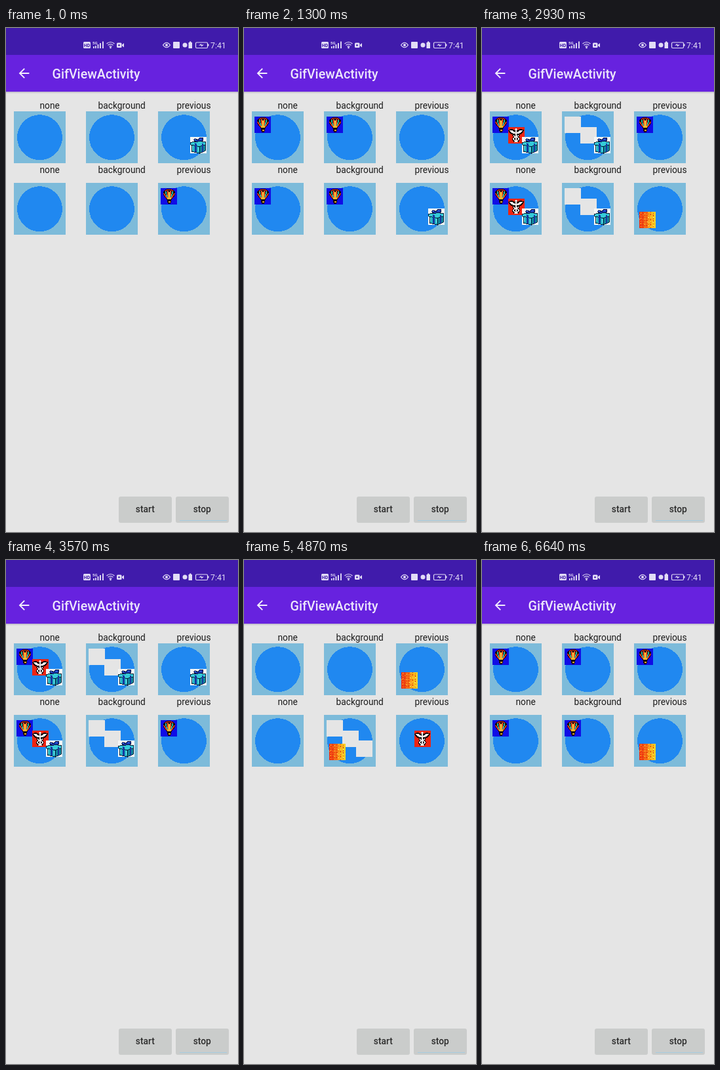
These frames come from a looping animation (354x768 px, 6.96 s). An HTML page:

```html
<!DOCTYPE html>
<html lang="en">
<head>
<meta charset="utf-8">
<title>GifViewActivity</title>
<style>
  html, body { margin: 0; width: 100%; height: 100%; overflow: hidden; background: #e5e5e5; }
  svg { display: block; }
  #stage { position: absolute; left: 0; top: 0; }
  text { font-family: Roboto, "Open Sans", sans-serif; }
  .label { font-size: 13.77px; fill: #1c1c1c; }
  .button { font-size: 13.77px; font-weight: 500; fill: #2c2c2c; text-anchor: middle; }
  .title { font-size: 19.67px; font-weight: 500; fill: #ece6fb; }
  .status { fill: #e2dcf6; }
  .line { fill: none; stroke: #e2dcf6; }
</style>
</head>
<body>
<svg id="stage" width="354" height="768" viewBox="0 0 354 768">
  <defs>
    <linearGradient id="shade" x2="0" y2="1">
      <stop offset="0" stop-color="#b9b5c4"/>
      <stop offset="1" stop-color="#e5e5e5"/>
    </linearGradient>
    <linearGradient id="heat">
      <stop offset="0" stop-color="#ee2d12"/>
      <stop offset=".45" stop-color="#f66a14"/>
      <stop offset=".7" stop-color="#f9b41a"/>
      <stop offset="1" stop-color="#fbd426"/>
    </linearGradient>

    <g id="base">
      <rect width="79" height="79" fill="#7dbbda"/>
      <circle cx="39.5" cy="39.7" r="34.5" fill="#2088f0"/>
    </g>

    <g id="balloon">
      <rect width="25" height="25" fill="#100ce6"/>
      <path d="M13 1C7.500 1 3.500 4 3.500 8c0 4 4.500 6.500 6.500 10.500h6c2-4 6.500-6.500 6.500-10.500C22.500 4 18.500 1 13 1z" fill="#140c10"/>
      <g fill="none" stroke-width="1.700">
        <path d="M10 16C8 12 5 10.500 5 7.500M16 16c2-4 5-5.500 5-8.500" stroke="#e83818"/>
        <path d="M11 16C9.500 11 7.500 9 7.800 5M15 16c1.500-5 3.500-7 3.200-11" stroke="#22b59a"/>
        <path d="M12 16c-.5-5-1.500-7-1.300-12M14 16c.5-5 1.500-7 1.300-12" stroke="#ee5a20"/>
        <path d="M13 17V6" stroke="#f2cf38"/>
        <path d="M7 4.500Q13 0 19 4.500" stroke="#d82a1c" stroke-width="1.300"/>
      </g>
      <path d="M9.500 14h7l-1 3h-5z" fill="#f0b82c"/>
      <path d="M10 18h6l-.7 5.500h-4.600z" fill="#1a1008"/>
      <path d="M11.500 20h3.200v2h-3.200z" fill="#d8a02c"/>
    </g>

    <g id="staff">
      <rect width="25" height="25" fill="#ee2411"/>
      <g fill="none" stroke-linejoin="round">
        <path id="rod" d="M12.500 3v20M2.500 5.500q5-1.500 7 1.500l3 2 3-2q2-3 7-1.500l-3 3.500-5 1.500-2-1-2 1-5-1.500zM8.500 11.500c0 4 8 3 8 6.500s-6 2-6 5M16.500 11.500c0 4-8 3-8 6.500s6 2 6 5" stroke="#120808" stroke-width="3.600"/>
        <path d="M12.500 3v20M8.500 11.500c0 4 8 3 8 6.500s-6 2-6 5M16.500 11.500c0 4-8 3-8 6.500s6 2 6 5" stroke="#f4eeee" stroke-width="1.400"/>
      </g>
      <path d="M2.500 5.500q5-1.500 7 1.500l3 2 3-2q2-3 7-1.500l-3 3.500-5 1.500-2-1-2 1-5-1.500z" fill="#f4eeee"/>
      <circle cx="12.500" cy="3.500" r="1.800" fill="#f4eeee"/>
    </g>

    <g id="gift">
      <rect width="25" height="25" fill="#f4f6f6"/>
      <g stroke="#0a2038" stroke-width="1">
        <path d="M2 12l12 2v11L2 22z" fill="#1fb4c6"/>
        <path d="M14 14l9-3v10l-9 4z" fill="#11899f"/>
        <path d="M.8 8.500L12 6l12 2-.5 4L14 14.500.8 12z" fill="#35cbd8"/>
      </g>
      <path d="M6.500 9l3.500 1v13.500L6.500 22.500zM17.500 10.500l2.500-1v13l-2.500 1z" fill="#1637a0"/>
      <path d="M3.500 14v6M12 16v6" stroke="#7ce4ea"/>
      <path d="M12 7Q7 8 5.500 4.500 7 1 12 5q2-4 5-4t3 3-8 3z" fill="#1838b4" stroke="#081440"/>
      <path d="M7.500 4.500l2 .7M15.500 4l2-1.300" stroke="#4c7cf0"/>
    </g>

    <g id="fire">
      <rect width="25" height="25" fill="url(#heat)"/>
      <g fill="none" stroke-width="1">
        <path d="M2.500 1v24M8.500 2v23M14.500 0v25" stroke="#fbc93a" stroke-dasharray="2 3 1 2"/>
        <path d="M5.500 0v25M11.500 1v24M17.500 0v25M21.500 2v23" stroke="#d8260c" stroke-dasharray="1 2 2 3"/>
        <path d="M0 4.500h25M0 11.500h25M1 18.500h24" stroke="#f58a16" stroke-dasharray="2 3"/>
        <path d="M13 8.500h12M12 15.500h13M13 21.500h12" stroke="#fdee5a" stroke-dasharray="2 2 1 3"/>
      </g>
    </g>
    <rect id="hole" width="25" height="25" fill="#e5e5e5"/>
  </defs>

  <rect width="354" height="768" fill="#e5e5e5"/>
  <rect y="97" width="354" height="3" fill="url(#shade)"/>
  <rect width="354" height="42" fill="#401bab"/>
  <rect y="41" width="354" height="56" fill="#6722df"/>

  <!-- status bar -->
  <g class="status">
    <rect x="118" y="21" width="11" height="10" rx="1.500"/>
    <text x="123.500" y="28.700" font-size="7" font-weight="700" text-anchor="middle" style="fill:#401bab">HD</text>
    <text x="132" y="25" font-size="6" font-weight="700">5G</text>
    <path d="M133 28h1.700v3H133zM136 27h1.700v4H136zM139.500 25h1.900v6h-1.900zM143 23h1.900v8H143zM147 20.500h1.900V31H147z"/>
    <circle cx="159.500" cy="30" r="1.300"/>
    <rect x="169" y="22.500" width="7.500" height="7.500" rx="1.500"/>
    <path d="M177 25.500l3-2.500v6.500l-3-2.500z"/>
    <circle cx="245" cy="26" r="2"/>
    <rect x="255" y="21" width="10" height="10" rx="1"/>
    <circle cx="273" cy="26" r="3.500"/>
    <path d="M278.500 22h1.500v-1.500h2.500V22h1.500v9h-5.500z"/>
    <path d="M308 24.500h1.500v3H308z"/>
    <path d="M294 26.500l4-2.500v1.500h4l-4 3v-2z"/>
    <text x="312" y="30.500" font-size="12.300">7:41</text>
  </g>
  <g class="line" stroke-width="1.200">
    <path d="M153.500 24q6-5 12 0M155.500 26.300q4-3.300 8 0M157.500 28.400q2-1.700 4 0"/>
    <path d="M239.500 26q5.500-7.500 11 0-5.500 7.500-11 0z"/>
    <rect x="289.500" y="22" width="18" height="8.500" rx="1.500"/>
  </g>
  <circle cx="172.500" cy="26.200" r="1.300" fill="#401bab"/>

  <!-- app bar -->
  <path transform="translate(15.700 57.200) scale(.983)" fill="#f1ecfc" d="M20 11H7.830l5.590-5.590L12 4l-8 8 8 8 1.410-1.410L7.830 13H20z"/>
  <text class="title" x="70.500" y="77">GifViewActivity</text>

  <g class="label">
    <text x="51.500" y="123">none</text>
    <text x="140.500" y="123">background</text>
    <text x="260.500" y="123">previous</text>
    <text x="51.500" y="221">none</text>
    <text x="140.500" y="221">background</text>
    <text x="260.500" y="221">previous</text>
  </g>

  <g id="views" shape-rendering="crispEdges"></g>

  <g fill="#cacccb">
    <rect x="172" y="714" width="81" height="40" rx="3"/>
    <rect x="259" y="714" width="81" height="40" rx="3"/>
  </g>
  <path d="M265 750.500h72" stroke="#a5cbe0"/>
  <text class="button" x="212.300" y="738">start</text>
  <text class="button" x="299.300" y="738">stop</text>
</svg>

<script>
  const LOOP = 6960;
  const NS = "http://www.w3.org/2000/svg";
  const sprites = [["balloon", 4, 8], ["staff", 27.5, 24], ["gift", 49, 39], ["fire", 8, 43.5]];

  // Each step is [start time, frame]; frame 0 is the bare disc.
  const plain = [[0, 0], [490, 1], [2280, 2], [2930, 3], [4220, 4], [4870, 0], [5670, 1]];
  const late = [[0, 0], [490, 1], [2280, 2], [2930, 3], [4380, 4], [5030, 0], [5670, 1]];
  const prevTop = [[0, 3], [160, 4], [1140, 0], [2440, 1], [3250, 2], [3570, 3], [4060, 4], [5030, 0], [6320, 1]];
  const prevLow = [[0, 1], [650, 2], [1300, 3], [2600, 4], [3410, 0], [3570, 1], [4540, 2], [5190, 3], [6480, 4]];

  const root = document.getElementById("views");
  const add = (parent, tag, attrs) => {
    const el = document.createElementNS(NS, tag);
    for (const key in attrs) el.setAttribute(key, attrs[key]);
    return parent.appendChild(el);
  };
  const use = (parent, id, x, y) => add(parent, "use", { href: "#" + id, x, y });

  function makeView(x, y, mode, steps) {
    const view = add(root, "g", { transform: `translate(${x} ${y})` });
    use(view, "base", 0, 0);
    const parts = sprites.map(([id, px, py]) => ({
      hole: use(view, "hole", px, py),
      image: use(view, id, px, py)
    }));
    return { parts, mode, steps, frame: -1 };
  }

  const views = [
    makeView(12, 127, "none", plain),
    makeView(122, 127, "background", plain),
    makeView(232, 127, "previous", prevTop),
    makeView(12, 236, "none", plain),
    makeView(122, 236, "background", late),
    makeView(232, 236, "previous", prevLow)
  ];

  const show = (el, on) => el.setAttribute("visibility", on ? "visible" : "hidden");

  function setFrame(view, frame) {
    if (view.frame === frame) return;
    view.frame = frame;
    view.parts.forEach(({ hole, image }, i) => {
      const past = i + 1 < frame;
      show(hole, past && view.mode === "background");
      show(image, i + 1 === frame || (past && view.mode === "none"));
    });
  }

  function draw() {
    const t = performance.now() % LOOP;
    for (const view of views) {
      let frame = 0;
      for (const [start, f] of view.steps) if (t >= start) frame = f;
      setFrame(view, frame);
    }
    requestAnimationFrame(draw);
  }
  draw();
</script>
</body>
</html>
```
